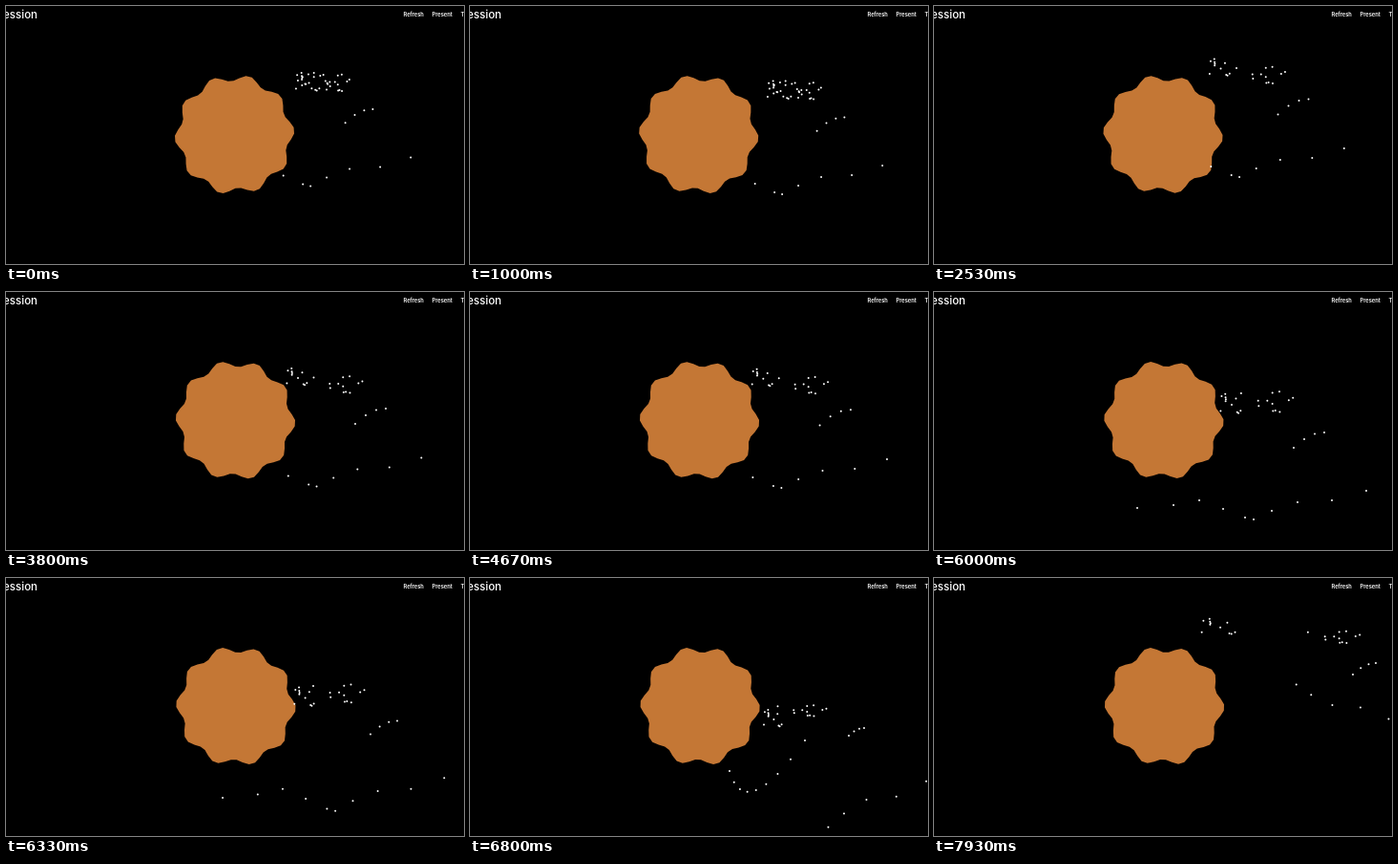
An HTML page with a canvas that plays this animation: 480x270 px, repeating every 8 s.

```html
<!DOCTYPE html>
<html lang="en">
<head>
<meta charset="utf-8">
<title>Particles</title>
<style>
  html, body { margin: 0; width: 100%; height: 100%; overflow: hidden; background: #000; }
  canvas { position: absolute; left: 0; top: 0; }
  .stage { position: absolute; width: 480px; height: 270px; overflow: hidden; }
  .stage span {
    position: absolute; top: 0; color: #fff; white-space: nowrap;
    font: 600 5.7px/18px Inter, Roboto, sans-serif;
  }
  .stage .title { top: -1px; right: 447px; font-size: 11.5px; font-weight: 500; line-height: 20px; }
</style>
</head>
<body>
<div class="stage">
  <canvas width="480" height="270"></canvas>
  <span class="title">Expression</span>
  <span style="left:416.5px">Refresh</span>
  <span style="left:446.5px">Present</span>
  <span style="left:476.5px">Tools</span>
</div>
<script>
const LOOP = 8000;
const ctx = document.querySelector('canvas').getContext('2d');
const mix = (a, b, k) => a + (b - a) * k;
const mixAll = (a, b, k) => a.map((v, i) => mix(v, b[i], k));

function seeded(seed) {
  return () => {
    seed = (seed * 16807) % 2147483647;
    return seed / 2147483647;
  };
}

function scatter(seed, count) {
  const rand = seeded(seed);
  return Array.from({ length: count }, () => {
    const r = Math.sqrt(rand()), a = 2 * Math.PI * rand();
    return [r * Math.cos(a), r * Math.sin(a)];
  });
}

const leftUnits = scatter(4177, 24);
const rightUnits = scatter(9203, 12);

// The trailing wave, right to left, around its own anchor.
const wave = [
  [53, -7], [17, 3], [-19, 5], [-46, 14], [-65, 23],
  [-74, 21], [-97, 12], [-122, 3], [-149, 8], [-187, 11]
];

// tail: x, y, stretch, wave height; arm: x, y, size; left and right clouds: x, y, rx, ry
const pose = (tail, arm, left, right, tailCount, leftCount = 11, streak = false) =>
  ({ tail, arm, left, right, tailCount, leftCount, streak });

function moved(p, dx, dy) {
  const shift = ([x, y, ...size]) => [x + dx, y + dy, ...size];
  return { ...p, tail: shift(p.tail), arm: shift(p.arm), left: shift(p.left), right: shift(p.right) };
}

const dense = pose([385, 174, 0.89, 1], [378, 120, 0.9], [329, 88, 21, 13], [352, 89, 18, 14], 7, 24);
const sparse = pose([386, 180.5, 0.93, 1], [382, 126, 1], [309, 89, 18, 12], [347, 97, 30, 14], 7);
const falling = pose([432, 224, 0.87, 1.6], [405, 159, 0.5], [321, 147, 16, 12], [347, 139, 30, 9], 5, 11, true);

const poses = [
  { ...moved(dense, -8, -8.5), tailCount: 7 },
  dense,
  moved(sparse, -6, -31),
  moved(sparse, -5, -18),
  moved(sparse, -1, -1),
  sparse,
  pose([398, 194.5, 1, 1], [389, 138, 1.1], [321, 97, 18, 14], [360, 103, 32, 13], 10),
  pose([400, 215, 1, 1], [393, 151, 1], [315, 117, 18, 14], [348, 115, 32, 17], 10),
  falling,
  moved(falling, -8, 2),
  pose([433, 139, 0.82, -1.2], [451, 92, 0.75], [305, 51, 30, 11], [418, 62, 32, 10], 5)
];

// Bursts of stepped motion: first step, last step, step count, position reached.
const bursts = [
  [70, 130, 2, 0.6], [870, 1000, 3, 1], [1670, 1670, 1, 2], [2530, 2600, 2, 3],
  [3200, 3270, 2, 4], [3800, 3800, 1, 5], [3870, 3930, 2, 5.08], [4530, 4730, 4, 5.12],
  [5000, 5130, 3, 6], [5200, 5200, 1, 6.04], [5400, 5670, 5, 7], [6200, 6800, 8, 8],
  [6870, 7000, 3, 9], [7470, 7530, 2, 9.15], [7730, 7930, 4, 10]
];

function positionAt(t) {
  let pos = 0;
  for (const [start, end, count, to] of bursts) {
    if (t < start) break;
    const gap = count > 1 ? (end - start) / (count - 1) : 1;
    const done = t >= end ? count : Math.floor((t - start) / gap) + 1;
    pos = mix(pos, to, done / count);
  }
  return pos;
}

function drawBlob(cx, cy, turn) {
  ctx.fillStyle = '#c47735';
  ctx.beginPath();
  for (let deg = 3; deg < 360; deg += 6) {
    const a = (deg + turn) * Math.PI / 180;
    const r = 59.4 + 3.6 * Math.cos(deg * Math.PI / 18);
    ctx.lineTo(cx + r * Math.cos(a), cy + r * Math.sin(a));
  }
  ctx.fill();
}

function tailDots([x, y, stretch, height], count) {
  return wave.slice(0, count).map(([u, v]) => [x + u * stretch, y + v * height]);
}

function armDots([x, y, size]) {
  return [-16, -5, 6, 16].map(u => [x + u * size, y + size * (((16 - u) / 8) ** 2 - 4)]);
}

function cloudDots([x, y, rx, ry], units) {
  return units.map(([u, v]) => [x + u * rx, y + v * ry]);
}

function streakDots() {
  return Array.from({ length: 9 }, (_, i) => {
    const t = i / 8, s = 1 - t;
    return [s * s * 272 + 2 * s * t * 288 + t * t * 351, s * s * 202 + 2 * s * t * 258 + t * t * 170];
  });
}

function draw(t) {
  const pos = positionAt(t);
  const i = Math.min(Math.floor(pos), poses.length - 2);
  const k = pos - i;
  const a = poses[i], b = poses[i + 1];
  const near = k < 0.5 ? a : b;
  const part = name => mixAll(a[name], b[name], k);
  const cx = 239.5 + 0.2 * pos, cy = 134.6 - 0.07 * pos;

  ctx.fillStyle = '#000';
  ctx.fillRect(0, 0, 480, 270);
  drawBlob(cx, cy, Math.min(8 * pos - 4, 4.2 - 0.27 * pos));

  const dots = [
    ...tailDots(part('tail'), near.tailCount),
    ...armDots(part('arm')),
    ...cloudDots(part('left'), leftUnits.slice(0, near.leftCount)),
    ...cloudDots(part('right'), rightUnits),
    ...(near.streak ? streakDots() : [])
  ];
  ctx.fillStyle = '#fff';
  for (const [x, y] of dots) {
    if (Math.hypot(x - cx, y - cy) < 56) continue;
    ctx.beginPath();
    ctx.arc(x, y, 1, 0, 7);
    ctx.fill();
  }
}

const began = performance.now();
function tick() {
  draw((performance.now() - began) % LOOP);
  requestAnimationFrame(tick);
}
tick();
</script>
</body>
</html>
```
